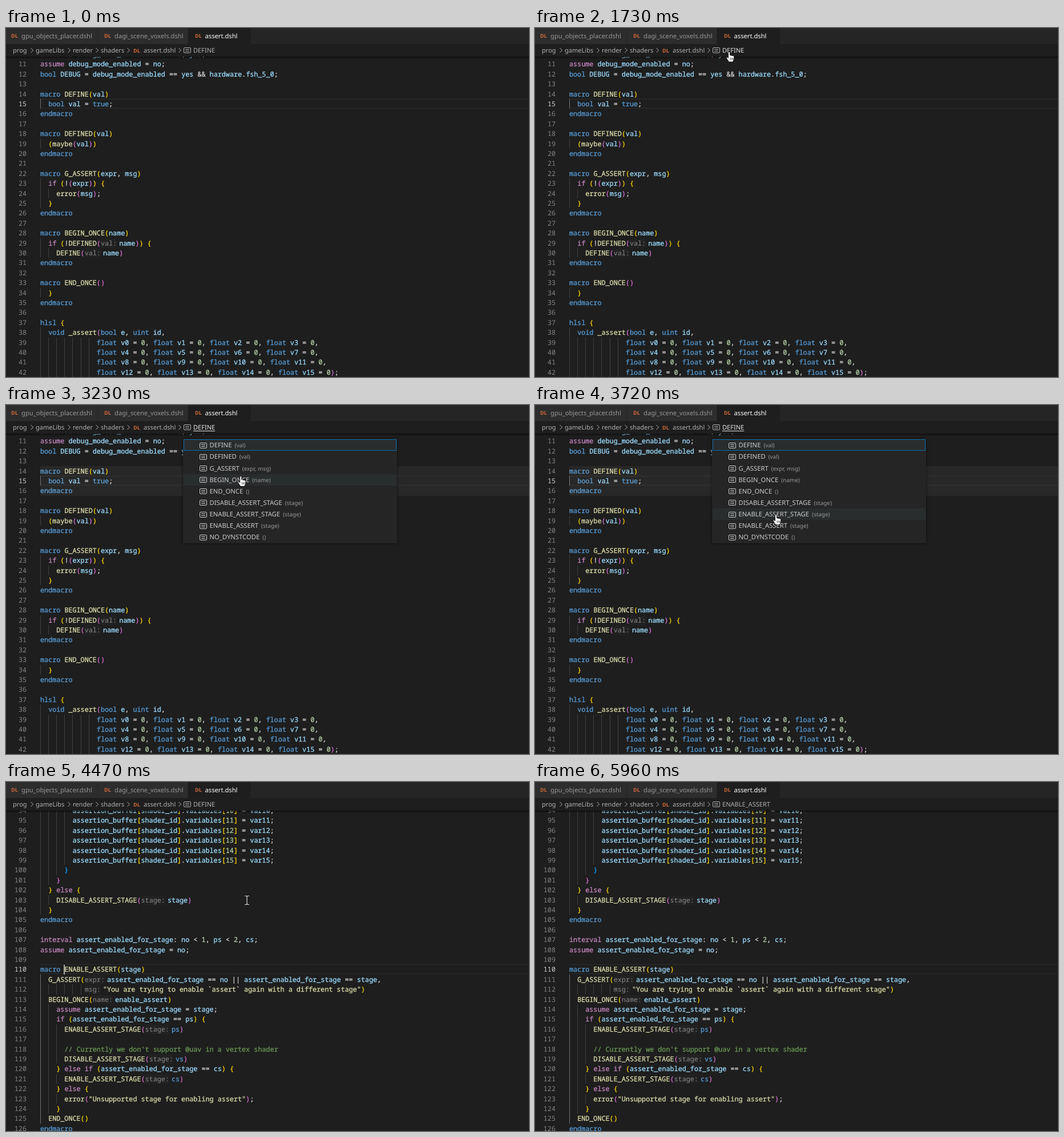
An HTML page for the animation above (6.09 s loop, 916x611 px).

```html
<!DOCTYPE html>
<html lang="en">
<head>
<meta charset="utf-8">
<title>Breadcrumb navigation</title>
<style>
html, body { margin: 0; width: 100%; height: 100%; overflow: hidden; background: #1e1e1e; }
#stage { position: absolute; left: 0; top: 0; width: 916px; height: 611px; overflow: hidden; background: #1e1e1e;
  font: 11.05px/20px "Noto Sans", "Open Sans", sans-serif; text-rendering: geometricPrecision; color: #b0b0b0; }
#stage div, #stage span.at, #stage svg { position: absolute; white-space: pre; }
svg { fill: none; stroke: currentColor; overflow: visible; }
.tabs { left: 0; top: 0; width: 916px; height: 28px; background: #252526; font-size: 11.2px; }
.tab { top: 0; height: 28px; background: #2d2d2d; line-height: 29px; color: #969696; }
.tab.on { background: #1e1e1e; color: #fff; }
.tab .dl { top: -1px; }
.dl { color: #d4693a; font-size: 9px; font-weight: 600; }
.crumbs { left: 0; top: 28px; width: 916px; height: 22px; line-height: 24px; background: #1e1e1e; }
.crumbs .hot { color: #e4e4e4; }
.crumbs .open { text-decoration: underline; text-underline-offset: 2px; }
.view { left: 0; top: 0; width: 916px; height: 611px;
  font: 11.77px/17.4px "Noto Sans Mono", "DejaVu Sans Mono", monospace; color: #d4d4d4; }
.row { left: 0; width: 916px; height: 17.4px; }
.row .num { left: 0; top: 1px; width: 36px; text-align: right; color: #858585; }
.row .code { left: 60px; top: 1px; -webkit-text-stroke: .3px; }
.row .guide { top: 0; width: 1px; height: 17.5px; background: #404040; }
.row .guide.on { background: #707070; }
.row.now .num { color: #d0d0d0; }
.row .edge { left: 60px; right: 0; top: 0; height: 15px; border: solid #2c2c2c; border-width: 1px 0; }
.range { left: 60px; right: 0; background: #ffffff0b; }
.key { color: #569cd6; } .flow { color: #c586c0; } .name { color: #9cdcfe; } .fn { color: #dcdcaa; }
.num2 { color: #b5cea8; } .str { color: #dcdcaa; } .note { color: #6a9955; }
.b0 { color: #ffd700; } .b1 { color: #da70d6; } .b2 { color: #179fff; }
.hint { color: #8a8a8a; background: #222; margin-right: 4px; border-radius: 2px; -webkit-text-stroke: 0; }
.shade { left: 0; top: 50px; width: 916px; height: 4px; background: linear-gradient(#0009, #0000); }
.caret { width: 2px; height: 17px; background: #aeafad; }
.menu { left: 310px; top: 59px; width: 375px; height: 183px; background: #252526; color: #ccc; box-shadow: 0 0 4px #000a; }
.item { left: 1px; width: 373px; height: 20px; line-height: 21px; }
.item.hover { background: #2a2d2e; }
.item:first-child { background: #2a2d2e; box-shadow: inset 0 0 0 1px #0c6aa8; }
.item svg { left: 28px; top: 5.5px; }
.item .label { left: 45.5px; font-size: 11.25px; }
.item small { font-size: 9.9px; color: #999; margin-left: 5px; }
</style>
</head>
<body>
<div id="stage"></div>
<script>
const LOOP = 6090, CELL = 7.06, LINE = 17.4;
const stage = document.getElementById('stage');
const keyWord = /^(macro|endmacro|bool|true|hlsl|void|float|uint)$/, flowWord = /^(if|else|assume|interval)$/;

function add(parent, cls, html = '', style = '') {
  const el = document.createElement('div');
  el.className = cls;
  el.innerHTML = html;
  el.style.cssText = style;
  return parent.appendChild(el);
}
const esc = s => s.replace(/&/g, '&amp;').replace(/</g, '&lt;');
const at = (x, text, cls = '') => `<span class="at ${cls}" style="left:${x}px">${text}</span>`;
const symbol = '<svg width="13" height="10"><rect x=".5" y=".5" width="12" height="9" rx="1.5"/><path d="M3 3.5h7M3 6.5h7"/></svg>';

// ~text~ marks an inlay hint
const tokens = /(\/\/.*)|~(.+?)~|("[^"]*")|(\b\d+\b)|([A-Za-z_]\w*)|([()[\]{}])|(.)/g;
function paint(line, state) {
  let afterHint = false;
  return line.replace(tokens, (all, note, hint, str, num, word, bracket, other, pos) => {
    const hinted = afterHint;
    afterHint = !!hint;
    let cls = '';
    if (note) cls = 'note';
    else if (hint) cls = 'hint';
    else if (str) cls = 'str';
    else if (num) cls = 'num2';
    else if (word) {
      if (keyWord.test(word) || hinted && /^[pvc]s$/.test(word)) cls = 'key';
      else if (flowWord.test(word)) cls = 'flow';
      else cls = line[pos + word.length] === '(' ? 'fn' : 'name';
    } else if (bracket) {
      const level = '([{'.includes(bracket) ? state.depth++ : --state.depth;
      cls = 'b' + level % 3;
    } else return esc(other);
    return `<span class="${cls}">${esc(hint || all)}</span>`;
  });
}

function makeView(first, top, now, depth, text, active) {
  const view = add(stage, 'view'), state = { depth };
  const lines = text.split('\n');
  const indent = i => lines[i].search(/\S/);
  lines.forEach((line, i) => {
    const n = first + i, row = add(view, 'row' + (n === now ? ' now' : ''), '', `top:${top + i * LINE}px`);
    if (n === now) add(row, 'edge');
    const cols = line ? indent(i) : Math.min(indent(i - 1), indent(i + 1));
    for (let c = 0; c < cols; c += 2)
      add(row, 'guide' + (!c && active(n) ? ' on' : ''), '', `left:${60 + c * CELL}px`);
    add(row, 'num', n);
    add(row, 'code', paint(line, state));
  });
  return view;
}

const floats = [0, 4, 8, 12].map(a => ' '.repeat(14) +
  [0, 1, 2, 3].map(k => `float v${a + k} = 0`).join(', ') + (a < 12 ? ',' : ');')).join('\n');
const before = makeView(10, 36.9, 15, 0, `interval debug_mode_enabled: no < 1, yes;
assume debug_mode_enabled = no;
bool DEBUG = debug_mode_enabled == yes && hardware.fsh_5_0;

macro DEFINE(val)
  bool val = true;
endmacro

macro DEFINED(val)
  (maybe(val))
endmacro

macro G_ASSERT(expr, msg)
  if (!(expr)) {
    error(msg);
  }
endmacro

macro BEGIN_ONCE(name)
  if (!DEFINED(~val:~name)) {
    DEFINE(~val:~name)
endmacro

macro END_ONCE()
  }
endmacro

hlsl {
  void _assert(bool e, uint id,
${floats}`, n => n === 15);

const buffers = [10, 11, 12, 13, 14, 15].map(k =>
  `        assertion_buffer[shader_id].variables[${k}] = var${k};`).join('\n');
const after = makeView(94, 40.9, 110, 3, `${buffers}
      }
    }
  } else {
    DISABLE_ASSERT_STAGE(~stage:~stage)
  }
endmacro

interval assert_enabled_for_stage: no < 1, ps < 2, cs;
assume assert_enabled_for_stage = no;

macro ENABLE_ASSERT(stage)
  G_ASSERT(~expr:~assert_enabled_for_stage == no || assert_enabled_for_stage == stage,
           ~msg:~"You are trying to enable \`assert\` again with a different stage")
  BEGIN_ONCE(~name:~enable_assert)
    assume assert_enabled_for_stage = stage;
    if (assert_enabled_for_stage == ps) {
      ENABLE_ASSERT_STAGE(~stage:~ps)

      // Currently we don't support @uav in a vertex shader
      DISABLE_ASSERT_STAGE(~stage:~vs)
    } else if (assert_enabled_for_stage == cs) {
      ENABLE_ASSERT_STAGE(~stage:~cs)
    } else {
      error("Unsupported stage for enabling assert");
    }
  END_ONCE()
endmacro`, n => n > 110);

const range = add(before, 'range', '', 'top:106.5px;height:52.2px');
const caret = add(stage, 'caret');
add(stage, 'shade');

const tabs = add(stage, 'tabs');
[[0, 160, 9, 27, 'gpu_objects_placer'], [161, 157, 11, 29, 'dagi_scene_voxels'], [319, 110, 12, 29.5, 'assert']]
  .forEach(([x, w, icon, label, name], i) =>
    add(tabs, i === 2 ? 'tab on' : 'tab', at(icon, 'DL', 'dl') + at(label, name + '.dshl'), `left:${x}px;width:${w}px`));

const crumbs = add(stage, 'crumbs');
crumbs.innerHTML = [[12, 'prog'], [52, 'gameLibs'], [117, 'render'], [166, 'shaders'], [241, 'assert.dshl']]
  .map(([x, s]) => at(x, s)).join('') + at(223, 'DL', 'dl') +
  [43, 108, 157, 212, 302].map(x => `<svg style="left:${x}px;top:7px" width="5" height="8"><path d="M.5 0l4 4-4 4"/></svg>`).join('');
const last = add(crumbs, '', '', 'left:311px;top:0');
last.innerHTML = symbol.replace('<svg', '<svg style="left:0;top:6px"') + at(17, '');
const lastText = last.querySelector('span');

const menu = add(stage, 'menu');
const items = ['DEFINE (val)', 'DEFINED (val)', 'G_ASSERT (expr, msg)', 'BEGIN_ONCE (name)', 'END_ONCE ()',
  'DISABLE_ASSERT_STAGE (stage)', 'ENABLE_ASSERT_STAGE (stage)', 'ENABLE_ASSERT (stage)', 'NO_DYNSTCODE ()']
  .map((s, i) => add(menu, 'item', symbol + at(45.5, s.replace(/ (.*)/, '<small>$1</small>'), 'label'),
    `top:${1.2 + i * 20.15}px`));

const pointer = (w, h, body) => add(stage, '', `<svg width="${w}" height="${h}">${body}</svg>`, 'left:0;top:0');
const beam = 'd="M-4-7.5h3l1 1 1-1h3M-4 7.5h3l1-1 1 1h3M0-7v14"';
const pointers = {
  beam: pointer(9, 16, `<path ${beam} stroke="#000" stroke-width="2.4" opacity=".5"/><path ${beam} stroke="#e8e8e8" stroke-width="1.2"/>`),
  arrow: pointer(12, 19, '<path d="M0 0v16l3.7-3.5 2.5 5.8 2.6-1.1-2.5-5.6h5.2z" fill="#fff" stroke="#000" stroke-width=".8"/>'),
  hand: pointer(14, 19, '<path d="M-1.5 1.5q1.5-2 3 0v5l6 1.3q1.5.6 1.4 2.2l-.8 4.5-1.4 3.7h-7.2l-4-6.2q-1-2 1-2l2 1.6z" fill="#fff" stroke="#000" stroke-width=".8"/><path d="M2 11v4M4.3 11v4M6.5 11v4" stroke="#000" stroke-width=".7"/>')
};

// start, last step, steps, from, to, easing for x and y
const out = k => p => 1 - (1 - p) ** k, into = k => p => p ** k;
const moves = [
  [520, 1120, 10, [862, 158], [378, 67], out(1.5)],
  [1190, 1530, 6, [360, 58], [340, 41], out(1.5)],
  [2400, 2950, 9, [340, 41], [391, 94], into(3)],
  [3020, 3580, 9, [391, 94], [422, 177], out(1.8), into(1.25)],
  [3650, 4000, 6, [422, 177], [422, 207], out(1.6)],
  [4940, 5490, 9, [422, 207.5], [907, 267], into(1.8)]
];
function mouseAt(t) {
  const i = moves.findLastIndex(m => t >= m[0]);
  if (i < 0 || t >= 5560) return null;
  const [start, end, n, a, b, ex, ey = ex] = moves[i];
  const step = Math.min(n - 1, Math.floor((t - start + 4) / (end - start) * (n - 1)));
  const p = i < 2 ? step / (n - 1) : (step + 1) / n;
  return [a[0] + (b[0] - a[0]) * ex(p), a[1] + (b[1] - a[1]) * ey(p)];
}

const show = (el, on) => { el.style.visibility = on ? 'visible' : 'hidden'; };
const within = (t, ...spans) => spans.some(([a, b]) => t >= a && t < b);

function draw(t) {
  const mouse = mouseAt(t), open = within(t, [2060, 4470]), jumped = t >= 4470;
  before.style.display = jumped ? 'none' : '';
  after.style.display = jumped ? '' : 'none';
  menu.style.display = range.style.display = open ? '' : 'none';

  show(caret, within(t, [190, 720], [1190, 1730], [4470, 4940], [5460, 5960]));
  caret.style.left = (jumped ? 101 : 186) + 'px';
  caret.style.top = (jumped ? 319.5 : 124.3) + 'px';

  const onCrumb = !jumped && mouse && mouse[1] < 50;
  lastText.textContent = t >= 4540 ? 'ENABLE_ASSERT' : 'DEFINE';
  lastText.className = 'at' + (onCrumb || open ? ' hot' : '') + (open ? ' open' : '');

  const hover = open && mouse ? Math.floor((mouse[1] - 60.2) / 20.15) : -1;
  items.forEach((el, i) => el.classList.toggle('hover', i === hover));

  let kind = 'beam';
  if (open && t >= 2400 && t < 4400) kind = mouse[1] < 60 ? 'arrow' : 'hand';
  else if (onCrumb) kind = 'hand';
  for (const k in pointers) {
    show(pointers[k], mouse && k === kind);
    if (mouse) pointers[k].style.transform = `translate(${mouse[0]}px, ${mouse[1]}px)`;
  }
}

const begun = performance.now();
function tick() {
  draw((performance.now() - begun) % LOOP);
  requestAnimationFrame(tick);
}
tick();
</script>
</body>
</html>
```
